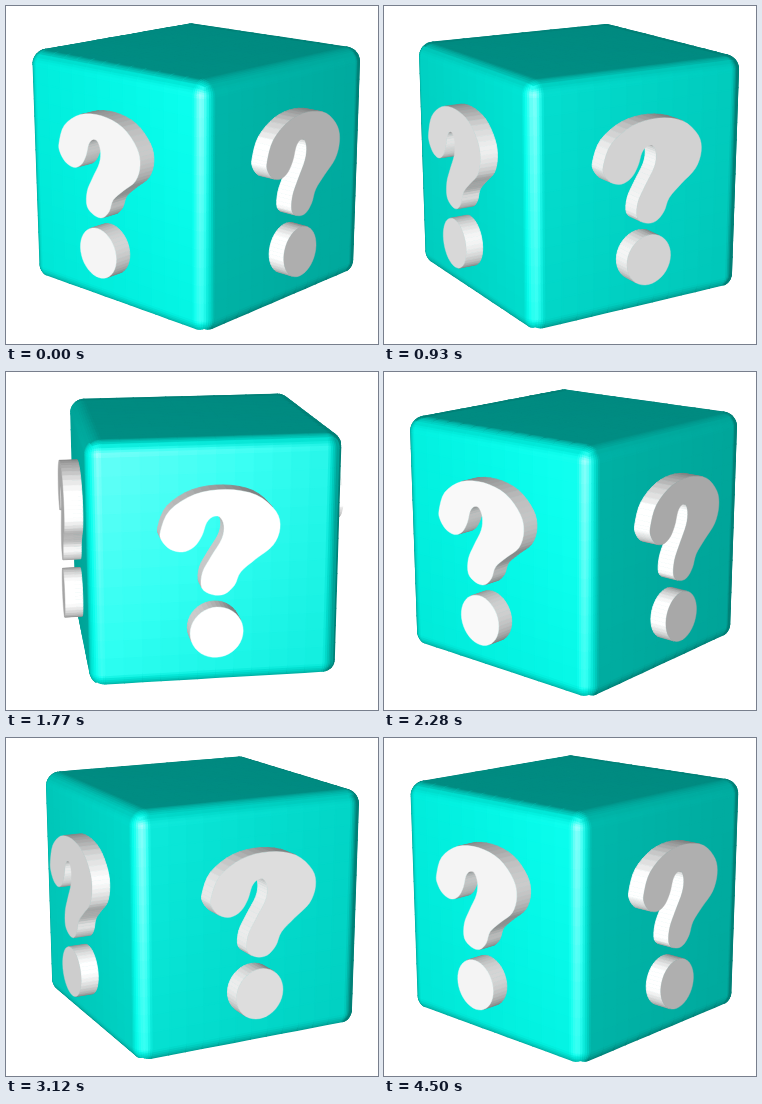
Write an HTML page with a canvas that moves like this. It is 372 by 338 pixels and loops after 4530 ms.

```html
<!DOCTYPE html>
<html lang="en">
<head>
<meta charset="utf-8">
<title>Question cube</title>
<style>
html, body { margin: 0; width: 100%; height: 100%; overflow: hidden; background: #fff; }
canvas { display: block; width: 372px; height: 338px; }
</style>
</head>
<body>
<canvas id="stage"></canvas>
<script>
const W = 372, H = 338, LOOP = 4530, STEP = 30;
const RAD = Math.PI / 180;
const START = 2.4, TURN = 2.3965;          // degrees, degrees per step

// camera
const CX = 191, CY = 158, DIST = 11, FOCAL = 1286;
const C = Math.cos(15.5 * RAD), S = Math.sin(15.5 * RAD);
const EYE = [0, DIST * S, DIST * C];
const LIGHT = [-1.8, 1.6, 6.8];

const ROUND = 0.12, INNER = 1 - ROUND, DEPTH = 1.15;

const canvas = document.getElementById('stage');
const ctx = canvas.getContext('2d');
const dpr = window.devicePixelRatio || 1;
canvas.width = W * dpr;
canvas.height = H * dpr;
ctx.scale(dpr, dpr);
ctx.lineJoin = 'round';

const sub = (a, b) => [a[0] - b[0], a[1] - b[1], a[2] - b[2]];
const add = (a, b) => [a[0] + b[0], a[1] + b[1], a[2] + b[2]];
const dot = (a, b) => a[0] * b[0] + a[1] * b[1] + a[2] * b[2];
const unit = a => { const l = Math.hypot(...a) || 1; return a.map(v => v / l); };
const mean = ps => ps.reduce(add).map(v => v / ps.length);
const clamp = (v, m) => Math.max(-m, Math.min(m, v));

function project(p) {
  const k = FOCAL / (DIST - p[1] * S - p[2] * C);
  return [CX + p[0] * k, CY - (p[1] * C - p[2] * S) * k];
}

function yaw(p, a) {
  const c = Math.cos(a), s = Math.sin(a);
  return [p[0] * c + p[2] * s, p[1], p[2] * c - p[0] * s];
}

const faces = (n, p) => dot(n, sub(EYE, p)) > 0;

function light(n, p) {
  const l = unit(sub(LIGHT, p)), v = unit(sub(EYE, p));
  return {
    lum: Math.min(1, 0.5 + 0.55 * Math.max(0, dot(n, l))),
    spec: 160 * Math.max(0, dot(n, unit(add(l, v)))) ** 13
  };
}

function cyan(n, p) {
  const { lum, spec } = light(n, p);
  const g = Math.min(255, 255 * lum + spec * 0.1);
  return `rgb(${Math.round(spec)},${Math.round(g)},${Math.round(Math.min(255, g * 0.93 + spec * 0.1))})`;
}

function gray(n, p) {
  const { lum, spec } = light(n, p);
  const g = Math.round(Math.min(255, 258 * lum + spec * 0.3));
  return `rgb(${g},${g},${g})`;
}

// the stroke hides the seams between neighbours
function poly(pts, color, seam) {
  ctx.beginPath();
  for (const p of pts) ctx.lineTo(...project(p));
  ctx.closePath();
  ctx.fillStyle = ctx.strokeStyle = color;
  ctx.lineWidth = seam;
  ctx.fill();
  ctx.stroke();
}

// grid lines of one side: dense along the rounded rims
const grid = [];
for (let i = 5; i > 0; i--) grid.push(-INNER - ROUND * Math.tan(9 * i * RAD));
for (let i = 0; i <= 12; i++) grid.push(INNER * (i / 6 - 1));
for (let i = 1; i <= 5; i++) grid.push(INNER + ROUND * Math.tan(9 * i * RAD));

function skin(u, v) {
  const q = [clamp(u, INNER), clamp(v, INNER), INNER];
  const n = unit(sub([u, v, 1], q));
  return { p: add(q, n.map(x => x * ROUND)), n };
}

const quads = [];
for (let i = 0; i + 1 < grid.length; i++) {
  for (let j = 0; j + 1 < grid.length; j++) {
    const k = [[i, j], [i + 1, j], [i + 1, j + 1], [i, j + 1]].map(([a, b]) => skin(grid[a], grid[b]));
    quads.push({ pts: k.map(c => c.p), n: unit(mean(k.map(c => c.n))) });
  }
}

// question mark outline, clockwise
const knots = [
  [-.458, .325], [-.386, .485], [-.193, .603], [.048, .632], [.28, .58], [.434, .445], [.468, .31],
  [.415, .175], [.28, .07], [.164, -.028], [.116, -.133], [.039, -.201], [-.058, -.201], [-.14, -.143],
  [-.135, -.018], [-.068, .107], [.015, .245], [.03, .35], [-.005, .42], [-.06, .42], [-.105, .375],
  [-.14, .275], [-.2, .19], [-.29, .153], [-.386, .18], [-.449, .25]
];

function smooth(ps, steps) {
  const out = [], n = ps.length;
  for (let i = 0; i < n; i++) {
    const [a, b, c, d] = [-1, 0, 1, 2].map(k => ps[(i + k + n) % n]);
    for (let s = 0; s < steps; s++) {
      const t = s / steps;
      out.push([0, 1].map(k => b[k] + 0.5 * t * (c[k] - a[k] +
        t * (2 * a[k] - 5 * b[k] + 4 * c[k] - d[k] + t * (3 * (b[k] - c[k]) + d[k] - a[k])))));
    }
  }
  return out;
}

const hook = smooth(knots, 4);
const ball = Array.from({ length: 40 }, (_, i) => {
  const a = -i * Math.PI / 20;
  return [-0.022 + 0.21 * Math.cos(a), -0.513 + 0.208 * Math.sin(a)];
});

function solid(shape, a) {
  const walls = [];
  shape.forEach((p, i) => {
    const q = shape[(i + 1) % shape.length];
    const n = yaw(unit([p[1] - q[1], q[0] - p[0], 0]), a);
    const pts = [[...p, 1], [...q, 1], [...q, DEPTH], [...p, DEPTH]].map(x => yaw(x, a));
    const mid = mean(pts);
    if (faces(n, mid)) walls.push({ pts, n, mid, far: Math.hypot(...sub(EYE, mid)) });
  });
  walls.sort((x, y) => y.far - x.far);
  for (const w of walls) poly(w.pts, gray(w.n, w.mid), 0.8);
  const n = yaw([0, 0, 1], a), mid = n.map(x => x * DEPTH);
  if (faces(n, mid)) poly(shape.map(p => yaw([...p, DEPTH], a)), gray(n, mid), 0.4);
}

function mark(a) {
  solid(ball, a);
  solid(hook, a);
}

const tip = p => [p[0], p[2], -p[1]];      // turns a side into the lid

function side(a, lid) {
  const az = Math.atan2(Math.sin(a), Math.cos(a)) / RAD;
  const open = !lid && az > 70 && az < 110;
  const place = p => yaw(lid ? tip(p) : p, a);
  for (const q of quads) {
    const n = place(q.n), pts = q.pts.map(place), mid = mean(pts);
    if (!faces(n, mid)) continue;
    // the side turned furthest from the light is see-through
    if (open && n[1] < 0.3 && Math.atan2(n[0], n[2]) > 76 * RAD) continue;
    poly(pts, cyan(n, mid), 1.5);
  }
}

function draw(step) {
  const base = (START - 45 + TURN * step) * RAD;
  const turns = [0, 1, 2, 3].map(k => base + k * Math.PI / 2);
  const shown = a => { const n = yaw([0, 0, 1], a); return faces(n, n); };
  ctx.fillStyle = '#fff';
  ctx.fillRect(0, 0, W, H);
  turns.filter(a => !shown(a)).forEach(mark);
  side(base, true);
  turns.forEach(a => side(a, false));
  turns.filter(shown).forEach(mark);
}

let last = -1;
const begin = performance.now();
function tick() {
  const t = Math.max(0, performance.now() - begin) % LOOP;
  const step = Math.floor(t / STEP);
  if (step !== last) draw(last = step);
  requestAnimationFrame(tick);
}
tick();
</script>
</body>
</html>
```
